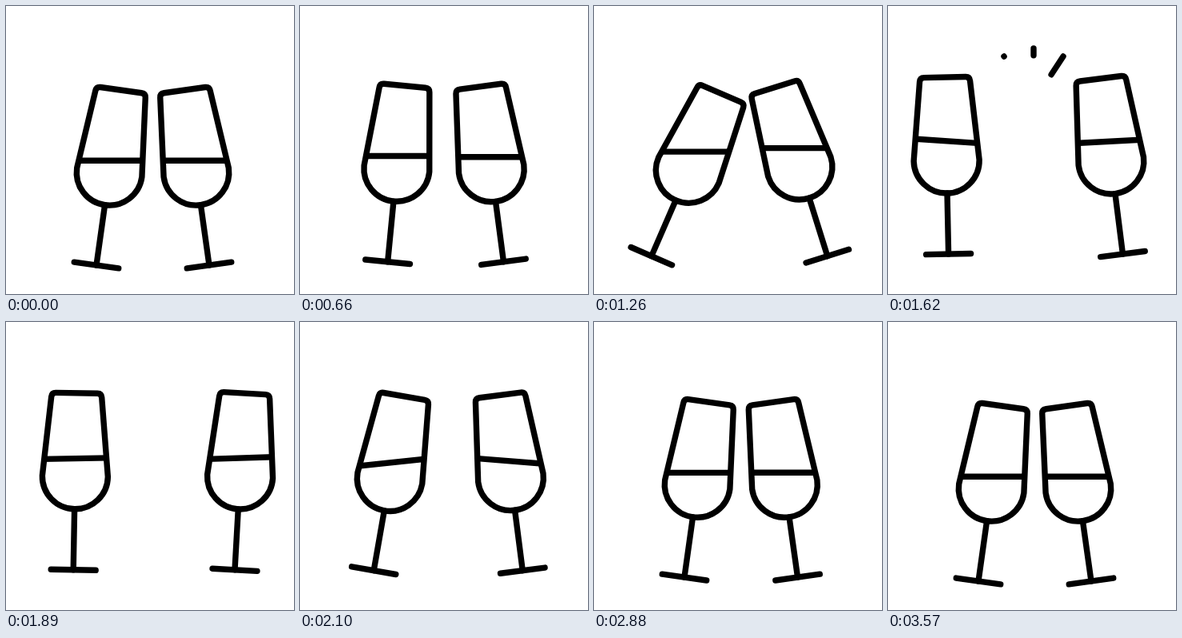
Write an HTML page with a canvas that moves like this. It is 360 px wide and 360 px high and loops after 3.6 s.

```html
<!DOCTYPE html>
<html lang="en">
<head>
<meta charset="utf-8">
<title>Clinking glasses</title>
<style>
  html, body { margin: 0; width: 100%; height: 100%; overflow: hidden; background: #fff; }
  canvas { display: block; }
</style>
</head>
<body>
<canvas id="stage" width="360" height="360"></canvas>
<script>
const ctx = document.getElementById('stage').getContext('2d');
const LOOP = 3600;
const LAG = 90;        // the right glass follows the left one
const MIRROR = 367;    // twice the x of the symmetry axis

const rad = deg => deg * Math.PI / 180;

// Smooth step from 0 to 1 between two times
function ease(t, from, to) {
  const u = Math.min(1, Math.max(0, (t - from) / (to - from)));
  return u * u * (3 - 2 * u);
}

// How far the foot is swung outwards, 0 to 1
const reach = t => ease(t, 520, 1330) - ease(t, 1290, 2900);

// Draw back, tip into the clink, recoil, settle
const lean = t => 8 - 8 * ease(t, 510, 920) + 24.5 * ease(t, 920, 1310)
  - 29.5 * ease(t, 1300, 1714) + 15 * ease(t, 1714, 2120) - 2 * ease(t, 2120, 2600);

const slosh = t => 4 * ease(t, 1250, 1660) - 10 * ease(t, 1660, 2120) + 6 * ease(t, 2120, 2600);

function line(x1, y1, x2, y2) {
  ctx.beginPath();
  ctx.moveTo(x1, y1);
  ctx.lineTo(x2, y2);
  ctx.stroke();
}

// Bowl outline, with the middle of the foot at the origin
const bowl = new Path2D(
  'M-41 -117 L-31.5 -216 Q-31 -221 -26 -221 H26 Q31 -221 31.5 -216 L41 -117 A41 41 0 0 1 -41 -117 Z');

function glass(t, footY) {
  const out = reach(t), angle = rad(lean(t));
  ctx.save();
  ctx.translate(113 - 42 * out, footY);
  ctx.rotate(angle);
  line(-28, 0, 28, 0);
  line(0, 0, 0, -76);
  ctx.stroke(bowl);
  ctx.clip(bowl);
  ctx.translate(0, -132 - 10.5 * out);
  ctx.rotate(rad(slosh(t)) - angle);
  line(-60, 0, 60, 0);
  ctx.restore();
}

// One ray of the fan; side is -1, 0 or 1
function spark(side, t) {
  const head = ease(t, 1360, 1480);
  const tail = ease(t, 1505, 1625);
  if (head === 0 || tail === 1) return;
  const x = 182 + 18 * side, y = 82 + 10 * Math.abs(side);
  const dx = 19 * side, dy = -29;
  line(x + dx * tail, y + dy * tail, x + dx * head, y + dy * head);
}

function draw(now) {
  const t = now % LOOP;
  const footY = 324 - 7.15 * (1 - Math.cos(2 * Math.PI * t / LOOP));

  ctx.fillStyle = '#fff';
  ctx.fillRect(0, 0, 360, 360);
  ctx.strokeStyle = '#000';
  ctx.lineWidth = 7.4;
  ctx.lineCap = ctx.lineJoin = 'round';

  glass(t, footY);
  ctx.save();
  ctx.translate(MIRROR, 0);
  ctx.scale(-1, 1);
  glass(t - LAG, footY);
  ctx.restore();

  for (let side = -1; side <= 1; side++) spark(side, t - 40 * (side + 1));
}

const start = performance.now();
function tick() {
  draw(performance.now() - start);
  requestAnimationFrame(tick);
}
tick();
</script>
</body>
</html>
```
